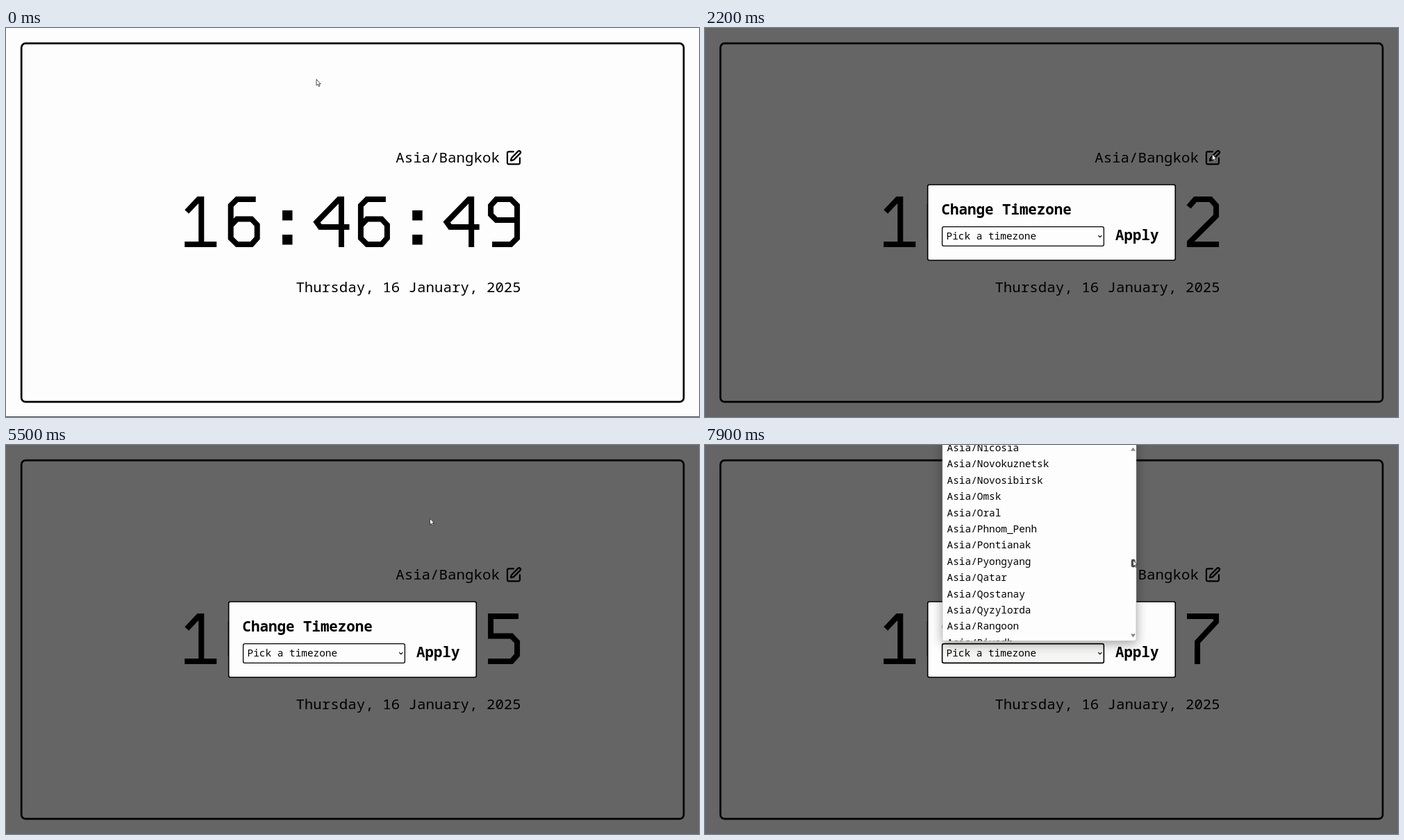
Write an HTML page that moves like this. It is 998 by 561 pixels and loops after 8000 ms.

```html
<!DOCTYPE html>
<html lang="en">
<head>
<meta charset="utf-8">
<title>World clock</title>
<style>
  html, body { margin: 0; width: 100%; height: 100%; overflow: hidden; background: #fdfdfd; }
  svg { display: block; width: 998px; height: 561px; }
  text { font: 20.8px "Noto Sans Mono", "DejaVu Sans Mono", monospace; white-space: pre; }
  .bold { font-weight: 700; }
  .small { font-size: 14.4px; }
  #alert text { font: 8px "Open Sans", "Noto Sans", sans-serif; fill: #fff; }
  #alert .bold { font-weight: 700; font-size: 8.7px; }
  #digits path { fill: none; stroke: #000; stroke-width: 8; }
  .line { fill: none; stroke: #000; }
  #list, #alert { filter: drop-shadow(0 4px 8px rgba(0, 0, 0, .35)); }
</style>
</head>
<body>
<svg viewBox="0 0 998 561">
  <rect width="998" height="561" fill="#fdfdfd"/>
  <rect x="22.2" y="22.2" width="953.8" height="517" rx="6" class="line" stroke-width="2.7"/>
  <text x="561.2" y="194">Asia/Bangkok</text>
  <g transform="translate(719 175.3)" class="line" stroke-width="2.2" stroke-linecap="round" stroke-linejoin="round">
    <path d="M12 3H5a2 2 0 0 0-2 2v14a2 2 0 0 0 2 2h14a2 2 0 0 0 2-2v-7"/>
    <path d="M18.4 2.6a1 1 0 0 1 3 3l-9 9a2 2 0 0 1-.9.5l-2.9.9a.5.5 0 0 1-.6-.6l.9-2.9a2 2 0 0 1 .5-.9z"/>
  </g>
  <g id="digits" role="img"></g>
  <path d="M398 263h14.5v14.5h-14.5zM398 298h14.5v14.5h-14.5zM585.2 263h14.5v14.5h-14.5zM585.2 298h14.5v14.5h-14.5z"/>
  <text x="417.4" y="381">Thursday, 16 January, 2025</text>
  <rect id="edge" y="560" width="998" height="1" fill="#555"/>

  <g id="modal">
    <rect width="998" height="561" opacity=".6"/>
    <rect x="320.7" y="226" width="356.6" height="109" rx="2.5" fill="#fdfdfd" stroke="#000" stroke-width="1.6"/>
    <text x="340.6" y="268.5" class="bold">Change Timezone</text>
    <rect id="select" x="341.6" y="286.6" width="232.8" height="27.8" rx="2.5" class="line" stroke-width="1.3"/>
    <text x="347.6" y="305.3" class="small">Pick a timezone</text>
    <path d="M566.3 299.2l2.5 2.5 2.5-2.5" class="line" stroke-width="1.2"/>
    <text x="591" y="305.7" class="bold">Apply</text>
  </g>

  <g id="list">
    <clipPath id="clip"><rect x="342" width="279" height="282.5"/></clipPath>
    <rect x="342" y="-10" width="279" height="292.5" rx="2" fill="#fdfdfd" stroke="#bbb" stroke-width=".6"/>
    <g clip-path="url(#clip)">
      <rect id="hover" x="342" width="270" height="23.4" fill="#707070"/>
      <g id="rows"></g>
    </g>
    <path d="M613 8.5h7l-3.5-5zM613 272.5h7l-3.5 5z" fill="#888"/>
    <rect id="thumb" x="613.7" width="6" height="12" rx="3"/>
  </g>

  <g id="alert">
    <rect x="355" y="20" width="289" height="81" rx="4" fill="#484848"/>
    <text x="364" y="39" class="bold">nuvtal-world-wide-time.netlify.app says</text>
    <text x="364" y="57.6">Please select a timezone</text>
    <rect x="593" y="70" width="42" height="21" rx="2" fill="#0a6ebb"/>
    <text x="613.5" y="83" text-anchor="middle" style="font-size:7.5px;font-weight:600">OK</text>
  </g>

  <g id="cursor" fill="#fff" stroke="#222" stroke-width=".8" stroke-linejoin="round">
    <path id="arrow" d="M0 0V9l2.1-1.9 1.5 3.3 1.4-.7-1.4-3.1H6.2z"/>
    <path id="hand" d="M-1 1q1-1.2 2 0v4l5 1.2q1.2.4 1 2l-.8 3.8H0L-3.4 7.8q-.2-1.4 1-1.1L-1 7.8z"/>
  </g>
</svg>
<script>
const $ = id => document.getElementById(id);
const ROW = 23.4, CELL = 62.4, LOOP = 8000, STEP = 100;

// Digit strokes in a 46 x 73 cell
const glyphs = [
  "M12 4H34L42 13V60L34 69H12L4 60V13Z",
  "M3 22L20 4H24V69M0 69H46",
  "M2.5 15L12 4H34L42 13V28L4 66V69H46",
  "M0 4H42V9L21 32.5H34L42 41V60L34 69H0",
  "M38.5 73V4H35L3 37L8 44H50",
  "M44 4H4V32.5H34L42 41V60L34 69H0",
  "M40 4H13L4 13V60L13 69H34L42 60V41L34 32.5H13L4 42",
  "M0 4H42V12L15 41V73",
  "M12 4H34L42 13V26L34 34H12L4 26V13ZM12 34L4 42V60L12 69H34L42 60V42L34 34",
  "M6 69H33L42 60V13L33 4H12L4 13V26L12 34H42"
];

// Pointer path: time, x, y
const path = [
  [0, 447, 74], [1000, 447, 74], [1800, 730.5, 182], [2700, 730.5, 182],
  [3500, 612, 297], [4200, 612, 297], [5000, 612, 78], [5350, 612, 78],
  [5500, 610.5, 106], [6000, 560, 297], [6300, 560, 297], [6500, 612, 172],
  [6700, 628.5, 46], [6900, 616.5, 14], [7050, 616.5, 14], [7900, 616.5, 166], [8000, 616.5, 180]
];

const zones = ["Pick a timezone", ...Intl.supportedValuesOf("timeZone")];
const scrollRate = (zones.indexOf("Asia/Nicosia") * ROW + 5.6) / 152;

function add(parent, tag, attrs) {
  const el = document.createElementNS("http://www.w3.org/2000/svg", tag);
  for (const k in attrs) el.setAttribute(k, attrs[k]);
  return parent.appendChild(el);
}
const digits = [0, 1, 3, 4, 6, 7].map(i =>
  add($("digits"), "path", { transform: `translate(${257.3 + i * CELL} 243)` }));
const rows = Array.from({ length: 14 }, () => add($("rows"), "text", { x: 348.6, class: "small" }));

const show = (id, on) => $(id).style.display = on ? "" : "none";

function pointer(t) {
  const i = path.findIndex(p => p[0] > t);
  const [t0, x0, y0] = path[i - 1], [t1, x1, y1] = path[i];
  const k = (t - t0) / (t1 - t0);
  return [x0 + (x1 - x0) * k, y0 + (y1 - y0) * k];
}

function drawList(t, x, y) {
  const drag = t > 7050 ? y - 14 : 0, scroll = drag * scrollRate;
  const inside = x <= 612 && y < 282;
  const hover = inside ? Math.round((y - 9.5) / ROW) : t < 6500 ? 0 : 7;
  const first = Math.max(0, Math.floor(scroll / ROW) - 1);
  rows.forEach((row, i) => {
    const n = first + i;
    row.textContent = zones[n] || "";
    row.setAttribute("y", 14.6 + n * ROW - scroll);
    row.setAttribute("fill", n === 0 ? "#777" : n === hover ? "#fff" : "#000");
  });
  $("hover").setAttribute("y", hover * ROW - 2.2 - scroll);
  $("hover").setAttribute("opacity", hover ? 1 : 0);
  $("thumb").setAttribute("y", 12.5 + drag);
  $("thumb").setAttribute("fill", t > 7050 ? "#555" : "#888");
}

function draw(t) {
  const modal = t >= 2150, alerting = t >= 3900 && t < 5400, open = t >= 6150;
  // The clock stands still while the alert is up
  const sec = 50 + Math.floor(((alerting ? 3900 : t) - 150) / 1000);
  const time = "1646" + sec;
  digits.forEach((d, i) => d.setAttribute("d", glyphs[time[i]]));
  $("digits").setAttribute("aria-label", "16:46:" + sec);

  show("modal", modal);
  show("edge", !modal);
  show("alert", alerting);
  show("list", open);
  $("select").setAttribute("stroke-width", alerting || open ? 1.6 : 1.3);
  $("select").style.fill = open ? "#f5f6f3" : "#fdfdfd";

  const [x, y] = pointer(t);
  const hand = t > 1760 && t < 2150 || t > 3400 && t < 4250;
  show("hand", hand);
  show("arrow", !hand);
  $("cursor").setAttribute("transform", `translate(${x} ${y})`);
  if (open) drawList(t, x, y);
}

const start = performance.now();
(function frame() {
  // The screen refreshes ten times a second
  const t = (performance.now() - start) % LOOP;
  draw(Math.floor(t / STEP) * STEP);
  requestAnimationFrame(frame);
})();
</script>
</body>
</html>
```
